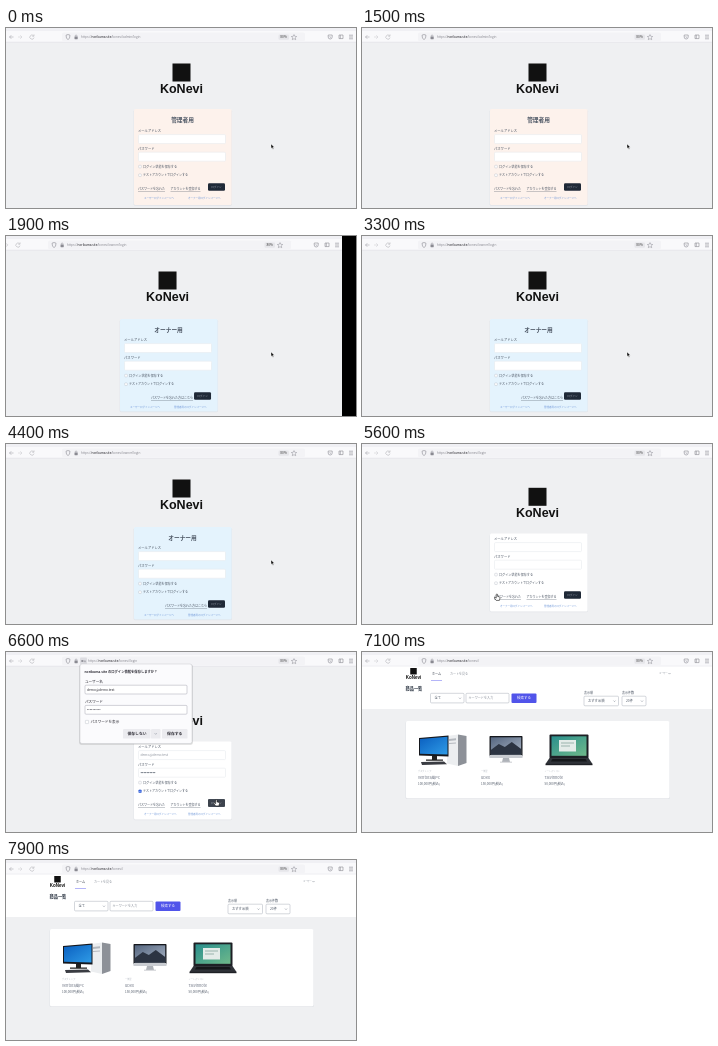
These frames come from a looping animation (350 px wide and 180 px high, 8 s). An HTML page:

```html
<!DOCTYPE html>
<html lang="ja">
<head>
<meta charset="utf-8">
<title>ログイン</title>
<style>
html, body { margin: 0; width: 100%; height: 100%; overflow: hidden; background: #000; }
svg { display: block; width: 350px; height: 180px; }
text { font-family: "Noto Sans CJK JP", "Noto Sans CJK", "Noto Sans", sans-serif; }
.brand { font-family: "Liberation Sans", sans-serif; font-weight: 700; }
.url { font-family: "Open Sans", sans-serif; }
</style>
</head>
<body>
<svg id="stage" viewBox="0 0 350 180"></svg>
<script>
const PITCH = 367, LOOP = 8000, STEP = 100;
const HOST = 'norikuma.site', SHOP = 'KoNevi';
const INK = '#4b5563', GREY = '#b4b9c2', BLUE = '#6f97d8', ICON = '#8a8a92';

const rect = (x, y, w, h, fill, more = '') =>
  `<rect x="${x}" y="${y}" width="${w}" height="${h}" fill="${fill}" ${more}/>`;
const line = (d, color = ICON, w = .6) =>
  `<path d="${d}" fill="none" stroke="${color}" stroke-width="${w}"/>`;
const shape = (d, fill) => `<path d="${d}" fill="${fill}"/>`;
// y is the vertical centre of the line
const text = (x, y, s, size, fill = INK, more = '') =>
  `<text x="${x}" y="${y + size * .37}" font-size="${size}" fill="${fill}" ${more}>${s}</text>`;
const group = (id, body) => `<g id="${id}">${body}</g>`;
const MID = 'text-anchor="middle"', BOLD = 'font-weight="700"', MID_BOLD = `${MID} ${BOLD}`;

const field = (x, y, w, h, stroke = '#e3e6ea') =>
  rect(x, y, w, h, '#fff', `rx="1" stroke="${stroke}" stroke-width=".5"`);
const box = (x, y, s = 2.6) =>
  rect(x - s / 2, y - s / 2, s, s, '#fff', 'rx=".5" stroke="#b4b9c2" stroke-width=".4"');
const link = (x, y, s, size, fill) =>
  text(x, y, s, size, fill, 'text-decoration="underline"');
const arrowDown = (x, y) => line(`M${x - 1} ${y - .5}l1 1 1-1`, '#6b7280', .5);

function logo(x, y, k) {
  return rect(x - 9 * k, y, 18 * k, 18 * k, '#111') +
    `<text class="brand" x="${x}" y="${y + 29.5 * k}" font-size="${12.5 * k}" fill="#111" ${MID}>${SHOP}</text>`;
}

const address = (x, path) =>
  `<text class="url" x="${x}" y="10.2" font-size="3.1" fill="#85858d">https://<tspan fill="#15141a">${HOST}</tspan>/konevi/${path}</text>`;

function chrome(path) {
  return rect(0, 0, 350, 180, '#eff0f2') +
    rect(0, 0, 350, 3, '#f0f0f4') + rect(0, 3, 350, 11, '#f9f9fb') +
    rect(0, 13.8, 350, .6, '#dedfe3') +
    rect(56, 4.5, 243, 8.6, '#f3f3f6', 'rx="1.5"') +
    line('M7.5 9h-4m1.8-1.8L3.5 9l1.8 1.8', '#a5a5ac') +
    line('M12 9h4m-1.8-1.8L16 9l-1.8 1.8', '#d0d0d5') +
    line('M27.6 7.8a2.1 2.1 0 1 0 .4 1.8M28 6.4v1.8h-1.8', '#b5b5bb') +
    line('M60 7.2l2-.7 2 .7q0 3.4-2 4.5-2-1.1-2-4.5z') +
    rect(68.5, 8.6, 3.2, 2.6, ICON, 'rx=".4"') +
    line('M69.2 8.7v-.8a.9.9 0 0 1 1.8 0v.8', ICON, .5) +
    address(75, path) +
    rect(272.5, 6.5, 10.5, 5.2, '#e6e6ea', 'rx="1.2"') +
    text(277.6, 9.1, '80%', 3.2, '#333', MID) +
    line('M288 6.6l.8 1.7 1.9.2-1.4 1.3.4 1.9-1.7-1-1.7 1 .4-1.9-1.4-1.3 1.9-.2z', ICON, .5) +
    line('M322.2 7h4v2a2 2 0 0 1-4 0zM323.3 8.5l.9.9.9-.9') +
    line('M333 7h4v3.6h-4zM334.3 7v3.6') +
    line('M343 7.2h4M343 9h4M343 10.8h4');
}

function login(o) {
  const { top, bottom, y, links } = o;
  return chrome(o.path) + logo(175.5, o.logoY, 1) +
    rect(127.6, top + .8, 98.4, bottom - top, '#e2e4e8', 'rx="1.5"') +
    rect(128, top, 97.6, bottom - top, o.card, 'rx="1.5"') +
    (o.title ? text(176.5, o.titleY, o.title, 5.7, INK, MID_BOLD) : '') +
    text(132, y, 'メールアドレス', 3.3) + field(132.5, y + 3.6, 87, 9) +
    text(132, y + 17.6, 'パスワード', 3.3) + field(132.5, y + 21.2, 87, 9) +
    box(134, y + 35.6) + text(137, y + 35.6, 'ログイン状態を保存する', 3.1) +
    box(134, y + 44.2) + text(137, y + 44.2, 'テストアカウントでログインする', 3) +
    links.map(([x, s]) => link(x, y + 58.2, s, 3, INK)).join('') +
    rect(202, y + 52.2, 17, 7.6, '#1f2937', 'rx="1.2"') +
    text(210.5, y + 56, 'ログイン', 2.6, '#9ca3af', MID) +
    o.foot.map(([x, s]) => text(x, y + 67, s, 2.5, BLUE)).join('');
}

const FORGOT = [[132, 'パスワードを忘れた'], [164.5, 'アカウントを登録する']];
const toUser = [138, 'ユーザーログインページへ'];
const toOwner = [182, 'オーナー用ログインページへ'];
const toAdmin = [182, '管理者用のログインページへ'];

const admin = login({
  path: 'admin/login', logoY: 35.5, top: 81, bottom: 177, card: '#fdf2ec',
  title: '管理者用', titleY: 92.3, y: 103, links: FORGOT, foot: [toUser, toOwner]
});
const owner = login({
  path: 'owner/login', logoY: 35.5, top: 83, bottom: 175.5, card: '#e4f3fd',
  title: 'オーナー用', titleY: 93.8, y: 104, links: [[159, 'パスワードを忘れた方はこちら']],
  foot: [toUser, toAdmin]
});
const user = login({
  path: 'login', logoY: 43.8, top: 89.5, bottom: 167.5, card: '#fff',
  y: 95, links: FORGOT, foot: [[138, toOwner[1]], toAdmin]
});

const filled = text(134.5, 103, 'demo@demo.test', 3.3, '#8b919b') +
  text(134.5, 120.6, '••••••••••', 4.4) +
  rect(132.6, 137.8, 2.9, 2.9, '#2f5fe0', 'rx=".5"') +
  line('M133.3 139.2l.6.7 1-1.3', '#fff', .4);

const press = rect(202, 147.2, 17, 7.6, '#3d434d', 'rx="1.2"') +
  text(210.5, 151, 'ログイン', 2.6, '#c4c8ce', MID);

const DARK = '#2b2a33';
const popup =
  rect(74.5, 5, 75, 7.6, '#f3f3f6') + rect(74, 5.6, 7, 6.6, '#dddde2', 'rx="1"') +
  `<circle cx="76.2" cy="9" r="1" fill="${ICON}"/>` + line('M77 9h2.8M79 9v1.3') + address(82, 'login') +
  rect(73.2, 12.5, 113.6, 80.3, '#000', 'rx="2" opacity=".14"') +
  rect(74, 12, 112, 79.5, '#fbfbfd', 'rx="2" stroke="#c9cacf" stroke-width=".5"') +
  text(78.5, 20, `${HOST} のログイン情報を保存しますか？`, 3.3, DARK, BOLD) +
  text(79, 30, 'ユーザー名', 3.6, DARK) + field(79, 33.2, 102, 8.8, '#a5a5b0') +
  text(81, 37.7, 'demo@demo.test', 3.3, DARK) +
  text(79, 50, 'パスワード', 3.6, DARK) + field(79, 53.4, 102, 8.8, '#a5a5b0') +
  text(81, 57.9, '••••••••••', 4, '#6b6b75') +
  box(81, 70, 3.2) + text(84.5, 70, 'パスワードを表示', 3.6, DARK) +
  rect(117, 77, 27.5, 9.6, '#ebebef', 'rx="1.2"') +
  rect(145, 77, 9.5, 9.6, '#ebebef', 'rx="1.2"') + arrowDown(149.7, 81.8) +
  rect(156, 77, 25.5, 9.6, '#ebebef', 'rx="1.2"') +
  text(131, 81.8, '保存しない', 3.8, DARK, MID_BOLD) +
  text(168.7, 81.8, '保存する', 3.8, DARK, MID_BOLD);

const select = (x, y, w, s) =>
  field(x, y, w, 9.6, '#a9afb8') + text(x + 4, y + 4.9, s, 3.3) + arrowDown(x + w - 4, y + 4.9);

const item = (x, kind, name, price) => text(x, 119.6, kind, 2.2, GREY) +
  text(x, 125.2, name, 3.8, '#6b7280') + text(x, 131.7, price + '円(税込)', 3, INK);

const desktop = shape('M85 84l11-1.5v31.5l-11-2.5z', '#eceef0') + shape('M96 82.5l8.5 1.5v27l-8.5 3z', '#8d9198') +
  shape('M87 87l7-.8v2l-7 .7zM87 91l7-.6v1.2l-7 .5z', '#b4b8be') +
  shape('M57 86l29.5-2.5v21l-29.5-1z', '#15171c') + shape('M58 87l27.5-2.3v17.8l-27.5-.7z', 'url(#sky)') +
  shape('M70 104h5v3.6h6v1.2h-17v-1.2h6z', '#222') + shape('M59 110l23-.5 3 2.8-25 .6z', '#3a3c42');
const allInOne = rect(127.5, 84, 33, 20.5, '#16181d', 'rx=".8"') + rect(128.8, 85.3, 30.4, 17.2, 'url(#dusk)') +
  shape('M128.8 98l8-6 6 3 7-5 9.4 7v5.5h-30.4z', '#2c3442') +
  rect(127.5, 103, 33, 3, '#c9ccd1') + shape('M141 106h6l1 4h-8z', '#aeb2b8') + rect(138, 109.7, 12, .9, '#c3c6cb');
const laptop = rect(187.5, 82.5, 39, 24, '#1d1f24', 'rx="1"') + rect(189.5, 84.3, 35, 19.5, 'url(#sea)') +
  rect(197, 88, 17, 11.5, '#e4ece9') + rect(199, 90.5, 13, 1, '#9bb5ae') + rect(199, 93.5, 9, 1, '#9bb5ae') +
  shape('M187.5 106h39l4 6h-47z', '#2f3238') + shape('M190.5 107h33l1.6 2.4h-36.2z', '#15171a') +
  rect(183.5, 111.8, 47, 1.4, '#1f2126');

const shop = chrome('') + rect(0, 14.4, 350, 43, '#fff') + rect(0, 57.2, 350, .5, '#e6e8eb') +
  logo(51.5, 16, .36) +
  text(70, 21.6, 'ホーム', 3, '#1f2937') + rect(69, 28.2, 11, .6, '#8284f4') +
  text(88, 21.6, 'カートを見る', 3, '#8b919b') +
  text(297, 21.6, 'ユーザー', 2.2, '#8b919b') + arrowDown(307.5, 21.6) +
  text(43.5, 36, '商品一覧', 4.2, '#1f2937', BOLD) +
  select(68.5, 41.3, 33.5, '全て') +
  field(104, 41.3, 43, 9.6, '#a9afb8') + text(106.5, 46.2, 'キーワードを入力', 3.1, '#8b919b') +
  rect(149.5, 41.5, 25, 9.6, '#5154ea', 'rx="1"') + text(162, 46.2, '検索する', 3.5, '#fff', MID) +
  text(222, 41.2, '表示順', 3) + select(222, 44.2, 34.5, 'おすすめ順') +
  text(260, 41.2, '表示件数', 3) + select(260, 44.2, 24, '20件') +
  rect(43.5, 69.5, 264.5, 77.5, '#e2e4e8', 'rx="1.5"') + rect(44, 69, 263.5, 77.3, '#fff', 'rx="1.5"') +
  desktop + allInOne + laptop +
  item(56, 'デスクトップ', 'ventora風PC', '100,000') +
  item(119, '一体型', 'uDex', '150,000') +
  item(182.5, 'ノートパソコン', 'Talvinnote', '50,000');

const gradient = (id, a, b) => `<linearGradient id="${id}" x2="1" y2="1">
  <stop stop-color="${a}"/><stop offset="1" stop-color="${b}"/></linearGradient>`;
const place = (n, body) =>
  `<svg x="${n * PITCH}" width="350" height="180">${body}</svg>`;

const stage = document.getElementById('stage');
stage.innerHTML =
  `<defs>${gradient('sky', '#0a5fc0', '#2f9be6')}${gradient('dusk', '#54657f', '#a9b4c4')}${gradient('sea', '#2a8f8d', '#6fb98a')}</defs>` +
  group('strip',
    place(0, user + group('filled', filled) + group('press', press) +
      group('popup', popup) + group('shop', shop)) +
    place(1, owner) + place(2, admin)) +
  group('cursor',
    group('arrow', '<path d="M0 0v4.6l1.1-1 .8 1.7.8-.4-.8-1.6h1.5z" fill="#111" stroke="#fff" stroke-width=".4"/>') +
    group('hand', '<path d="M-.8-2.6q.8-.8 1.4 0v2l2 .5q.6.3.4 1.2l-.6 2.3h-3.2l-1.9-2.4q0-.9.9-.6l1 .7z" fill="#fff" stroke="#111" stroke-width=".6"/>'));

const get = id => document.getElementById(id);
const show = (id, on) => { get(id).style.display = on ? '' : 'none'; };
const move = (id, x, y) => get(id).setAttribute('transform', `translate(${x} ${y})`);
const clamp = u => Math.min(1, Math.max(0, u));
const swipe = (t, start) => 1 - (1 - clamp((t - start) / 550)) ** 3;

// time, x, y of the pointer
const TRACK = [[0, 265, 116], [5150, 265, 116], [5500, 135, 153], [5600, 135, 153],
  [5800, 134, 140], [6000, 134, 140], [6300, 210.5, 150.5], [LOOP, 210.5, 150.5]];

function pointer(t) {
  const i = TRACK.findIndex(p => p[0] > t);
  const [a, x, y] = TRACK[i - 1], [b, x2, y2] = TRACK[i];
  const u = (t - a) / (b - a), e = u * u * (3 - 2 * u);
  return [x + (x2 - x) * e, y + (y2 - y) * e];
}

function draw(now) {
  const t = Math.floor(now % LOOP / STEP) * STEP;
  const hand = t >= 5500, shopping = t >= 7000;
  move('strip', PITCH * (swipe(t, 1535) + swipe(t, 4965) - 2), 0);
  move('cursor', ...pointer(t));
  show('hand', hand);
  show('arrow', !hand);
  show('cursor', !shopping);
  show('filled', t >= 5900);
  show('press', t >= 6300);
  show('popup', t >= 6500);
  show('shop', shopping);
}

const begin = performance.now();
function tick() {
  draw(performance.now() - begin);
  requestAnimationFrame(tick);
}
tick();
</script>
</body>
</html>
```
